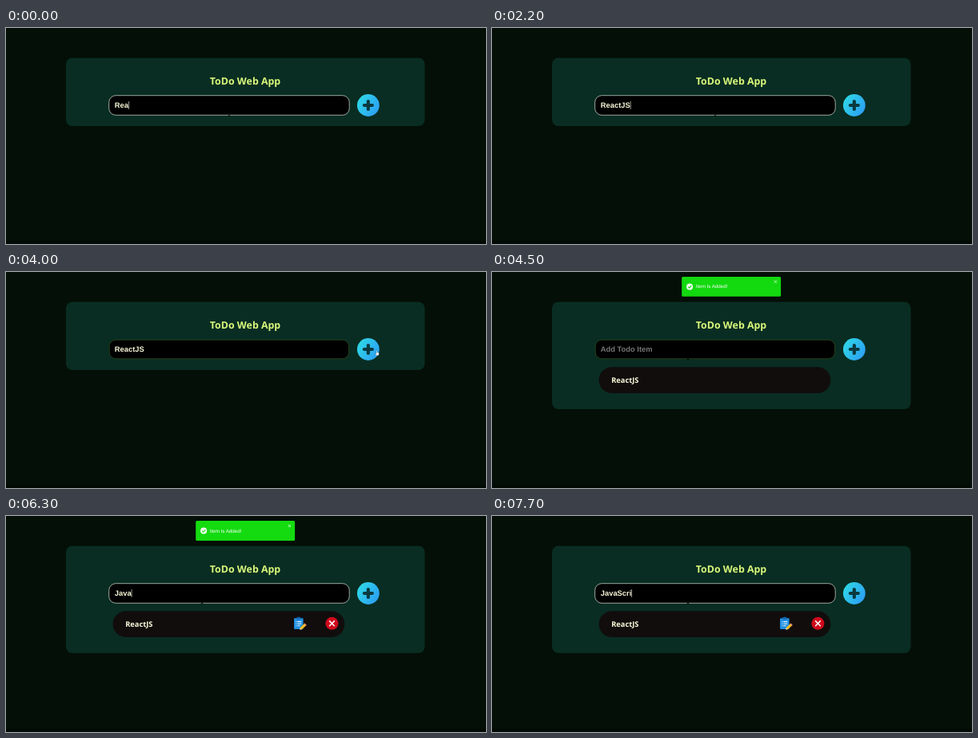
Write an HTML page that moves like this. It is 600 px wide and 271 px high and loops after 8 s.

```html
<!DOCTYPE html>
<html lang="en">
<head>
<meta charset="utf-8">
<title>ToDo Web App</title>
<style>
  html, body { margin: 0; width: 100%; height: 100%; overflow: hidden; background: #040f07; }
  svg { display: block; width: 600px; height: 271px; }
  text { text-rendering: geometricPrecision; white-space: pre; }
  .ui { font-family: "Open Sans", "Noto Sans", sans-serif; font-weight: 700; }
  .field { font: 700 9.35px "Liberation Sans", Arial, sans-serif; }
  .toast { font: 6.2px "Liberation Sans", Arial, sans-serif; }
</style>
</head>
<body>
<svg viewBox="0 0 600 271">
  <defs>
    <linearGradient id="aqua" x1="0" y1="0.2" x2="1" y2="0.8">
      <stop offset="0" stop-color="#2fd9e6"/>
      <stop offset="1" stop-color="#2c9df4"/>
    </linearGradient>
  </defs>
  <rect width="600" height="271" fill="#040f07"/>
  <rect y="267" width="600" height="4" fill="#020a05"/>

  <rect id="panel" x="75" y="37.5" width="448.5" height="85.5" rx="8" fill="#092d22"/>
  <text class="ui" x="299" y="71" font-size="12.4" text-anchor="middle" fill="#d9f97b">ToDo Web App</text>

  <rect id="input" fill="#000"/>
  <text id="hint" class="field" x="135.8" y="100.3" fill="#757575">Add Todo Item</text>
  <text id="typed" class="field" x="135.8" y="100.3" fill="#f8f8d8"></text>
  <rect id="caret" y="92" width="0.7" height="10" fill="#d8d8c8"/>

  <circle cx="452.8" cy="97" r="13.9" fill="url(#aqua)"/>
  <path d="M447.8 97h10M452.8 92v10" stroke="#0b3a40" stroke-width="4.2" stroke-linecap="round"/>

  <g id="item">
    <rect x="133.5" y="119.2" width="289.8" height="32.8" rx="16.4" fill="#110d0d"/>
    <text class="ui" x="149.2" y="138.6" font-size="9.3" fill="#fbfbdc">ReactJS</text>
  </g>
  <g id="icons">
    <rect x="360" y="128.3" width="11.6" height="13.7" rx="1.2" fill="#1f8fe0"/>
    <rect x="363.4" y="126.8" width="4.8" height="3" rx="1" fill="#1565b0"/>
    <path d="M362.3 132.6h1M362.3 135.2h1M362.3 137.8h1M364.3 132.6h5M364.3 135.2h5M364.3 137.8h3.2" stroke="#e8f6ff" stroke-width="1.1"/>
    <path d="M368.6 141.3l5.8-5.4" stroke="#f7bd1c" stroke-width="3.2"/>
    <path d="M373.6 136.6l1-.9" stroke="#f08a80" stroke-width="3.2"/>
    <path d="M367.2 142.8l.4-2.8 2.2 2.3z" fill="#f3d9a0"/>
    <circle cx="407.4" cy="134.8" r="8" fill="#cf0a1c"/>
    <path d="M404.5 131.9l5.8 5.8M410.3 131.9l-5.8 5.8" stroke="#fff" stroke-width="1.5" stroke-linecap="round"/>
  </g>

  <path id="beam" d="M-1.5 0h3M0 0v-6M-1.5 -6h3" stroke="#000" stroke-width="0.9" fill="none"/>
  <path id="hand" d="M-1 -3.2q.6-.6 1.1 0v2l2.1.6v1.8l-.8 1.6h-2.4l-1.6-2.2.3-.6 1.3.6z" fill="#fff" stroke="#173040" stroke-width="0.3"/>

  <g id="toast">
    <rect x="237.2" width="123.9" height="24.9" rx="1.6" fill="#14db10"/>
    <circle cx="247.1" cy="12.5" r="4" fill="#fff"/>
    <path d="M245 12.6l1.6 1.6 2.8-3.2" stroke="#14db10" stroke-width="1.1" fill="none"/>
    <text class="toast" x="254.8" y="14.6" fill="#fff">Item Is Added!</text>
    <path d="M352.8 4.7l3.2 3.2M356 4.7l-3.2 3.2" stroke="#e4ffe2" stroke-width="0.8"/>
  </g>
</svg>
<script>
const LOOP = 8000, ADDED = 4100, TOAST_IN = 4146, TOAST_OUT = 6344, TOAST_MS = 700;
const PX = 0.3875; // page scale of the stage
const el = id => document.getElementById(id);
const [panel, input, hint, typed, caret, item, icons, beam, hand, toast] =
  ['panel', 'input', 'hint', 'typed', 'caret', 'item', 'icons', 'beam', 'hand', 'toast'].map(el);
const show = (node, on) => node.setAttribute('visibility', on ? 'visible' : 'hidden');
const set = (node, attrs) => { for (const k in attrs) node.setAttribute(k, attrs[k]); };
const within = (t, a, b) => t >= a && t < b;

function bezier(x1, y1, x2, y2) {
  const curve = (a, b, s) => 3 * a * s * (1 - s) ** 2 + 3 * b * s * s * (1 - s) + s ** 3;
  return x => {
    let lo = 0, hi = 1;
    for (let i = 0; i < 24; i++) {
      const mid = (lo + hi) / 2;
      if (curve(x1, x2, mid) < x) lo = mid; else hi = mid;
    }
    return curve(y1, y2, lo);
  };
}
const ease = bezier(0.25, 0.1, 0.25, 1);
const easeOut = bezier(0.215, 0.61, 0.355, 1);
const smooth = bezier(0.42, 0, 0.58, 1);

// Points are [position, value], eased within each section.
function track(points, p, easing) {
  if (p <= points[0][0]) return points[0][1];
  for (let i = 1; i < points.length; i++) {
    const [a, from] = points[i - 1], [b, to] = points[i];
    if (p < b) return from + (to - from) * easing((p - a) / (b - a));
  }
  return points[points.length - 1][1];
}

const BOUNCE_IN = [[0, -3000], [0.6, 25], [0.75, -10], [0.9, 5], [1, 0]];
const BOUNCE_OUT = [[0, 0], [0.2, -10], [0.4, 20], [0.45, 20], [1, -2000]];
const MOUSE_X = [[2800, 279], [3200, 464], [3300, 464], [3400, 457], [3500, 457], [3600, 464], [4100, 464], [4500, 245]];
const MOUSE_Y = [[2800, 110.4], [3200, 99.5], [3300, 99.5], [3400, 95], [3500, 95], [3600, 102], [4100, 102], [4500, 110]];

const typing = (word, done, times, t) => word.slice(0, done + times.filter(k => t >= k).length);
function fieldText(t) {
  return t < ADDED
    ? typing('ReactJS', 3, [300, 500, 1500, 2000], t)
    : typing('JavaScri', 0, [5300, 5600, 5900, 6200, 6500, 6900, 7200, 7600], t);
}

function draw(t) {
  const added = t >= ADDED;
  const focused = !within(t, 3100, 4800);
  panel.setAttribute('height', added ? 134.5 : 85.5);
  show(item, added);
  show(icons, t >= 4800);

  set(input, focused
    ? { x: 128.7, y: 84.7, width: 300.5, height: 24.6, rx: 8.5, stroke: '#c3ccc3', 'stroke-width': 0.8 }
    : { x: 129.2, y: 85.2, width: 299.3, height: 23.6, rx: 8, stroke: '#2f4a1c', 'stroke-width': 0.8 });
  const text = fieldText(t);
  typed.textContent = text;
  show(hint, !text);
  caret.setAttribute('x', 135.9 + (text ? typed.getComputedTextLength() : 0));
  show(caret, focused && !within(t, 1000, 1500) && !within(t, 2600, 3100));

  const x = track(MOUSE_X, t, smooth), y = track(MOUSE_Y, t, smooth);
  const overButton = Math.hypot(x - 452.8, y - 97) < 14;
  beam.setAttribute('transform', `translate(${x} ${y})`);
  hand.setAttribute('transform', `translate(${x} ${y})`);
  show(beam, !overButton);
  show(hand, overButton);

  const leaving = t >= TOAST_OUT;
  const p = (t - (leaving ? TOAST_OUT : TOAST_IN)) / TOAST_MS;
  const shift = leaving ? track(BOUNCE_OUT, p, ease) : track(BOUNCE_IN, p, easeOut);
  const alpha = leaving ? track([[0.45, 1], [1, 0]], p, ease) : track([[0, 0], [0.6, 1]], p, easeOut);
  set(toast, { transform: `translate(0 ${6.1 + shift * PX})`, opacity: alpha });
}

const start = performance.now();
(function frame() {
  draw((performance.now() - start) % LOOP);
  requestAnimationFrame(frame);
})();
</script>
</body>
</html>
```
